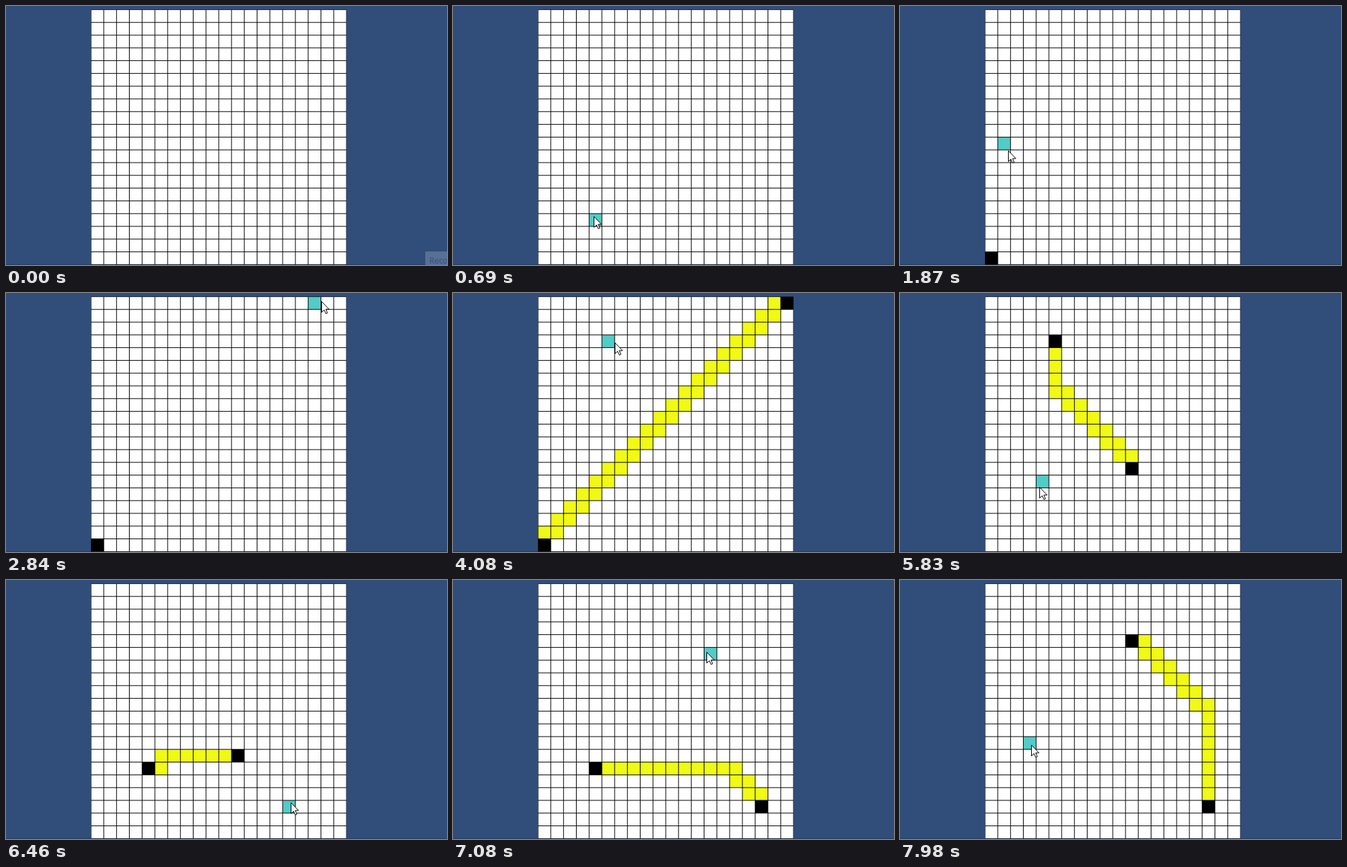
Write an HTML page with a canvas that moves like this. It is 649 px wide and 382 px high and loops after 8000 ms.

```html
<!DOCTYPE html>
<html lang="en">
<head>
<meta charset="utf-8">
<title>Grid path finder</title>
<style>
  html, body { margin: 0; width: 100%; height: 100%; overflow: hidden; background: #314d79; }
  canvas { position: absolute; left: 0; top: 0; display: block; }
  #tip {
    position: absolute; left: 617px; top: 362px; width: 32px; height: 20px;
    box-sizing: border-box; padding-left: 6px; overflow: hidden; white-space: nowrap;
    background: #586f96; color: #34507c;
    font: 12px/28px "Open Sans", "Noto Sans", sans-serif;
  }
</style>
</head>
<body>
<canvas id="stage" width="649" height="382"></canvas>
<div id="tip">Reco</div>
<script>
const LOOP = 8000, N = 20, PITCH = 18.8, LEFT = 125.1, TOP = 5.4, BORDER = 0.5;
const WHITE = '#fff', BLACK = '#000', TEAL = '#53cbc6', YELLOW = '#f0fa14';
const ctx = document.getElementById('stage').getContext('2d');
const tip = document.getElementById('tip');

// Key points of the pointer: time, x, y.
const route = [
  [70, 600, 376], [490, 240, 268], [630, 207, 310], [1250, 135, 370],
  [1530, 135, 370], [2200, 182, 62], [2420, 160, 14], [2840, 464, 12],
  [3250, 494, 12], [4080, 238, 73], [4290, 238, 73], [5120, 341, 262],
  [5810, 205, 286], [6640, 456, 335], [7060, 373, 106], [7270, 343, 97],
  [7960, 193, 243]
];

// The picture advances every 70 ms, with a longer rest once per 830 ms.
function snap(t) {
  const phase = (t + 70) % 830;
  return Math.max(0, t - phase + 70 * Math.min(10, Math.floor(phase / 70)));
}

const ease = f => f * f * (3 - 2 * f);

function pointer(t) {
  const k = route.findIndex(p => p[0] > t);
  if (k < 0) return route[route.length - 1].slice(1);
  const [t0, x0, y0] = route[k - 1], [t1, x1, y1] = route[k];
  const f = ease((t - t0) / (t1 - t0));
  return [Math.round(x0 + (x1 - x0) * f), Math.round(y0 + (y1 - y0) * f)];
}

function cellAt([x, y]) {
  return [Math.floor((x - 1 - LEFT) / PITCH), Math.floor((y - 1 - TOP) / PITCH)];
}

// Clicks place the start and the end in turn, in the cell under the pointer.
const clicks = [1250, 3250, 4290, 5120, 5880, 6640, 7270]
  .map(time => ({ time, cell: cellAt(pointer(time)) }));

// A moved start gives the staircase first, a moved end the straight part first.
function findPath([x, y], [ex, ey], stairsFirst) {
  const w = Math.abs(ex - x), h = Math.abs(ey - y);
  const sx = Math.sign(ex - x), sy = Math.sign(ey - y);
  const stairs = (sy < 0 && !stairsFirst ? 'vh' : 'hv').repeat(Math.min(w, h));
  const straight = (w > h ? 'h' : 'v').repeat(Math.abs(w - h));
  const moves = stairsFirst ? stairs + straight : straight + stairs;
  return [...moves].slice(0, -1).map(m => {
    if (m === 'h') x += sx; else y += sy;
    return [x, y];
  });
}

function drawCell(col, row, color) {
  const size = PITCH - 2 * BORDER;
  ctx.fillStyle = color;
  ctx.fillRect(LEFT + col * PITCH + BORDER, TOP + row * PITCH + BORDER, size, size);
}

function drawPointer(x, y) {
  const shape = [[0, 0], [0, 16], [3.7, 12.5], [6.3, 18], [8.6, 17], [6.2, 11.5], [11, 11.5]];
  ctx.beginPath();
  for (const [dx, dy] of shape) ctx.lineTo(x + dx + 0.5, y + dy + 0.5);
  ctx.closePath();
  ctx.fillStyle = WHITE;
  ctx.fill();
  ctx.strokeStyle = BLACK;
  ctx.stroke();
}

function draw(t) {
  ctx.fillStyle = '#314d79';
  ctx.fillRect(0, 0, 649, 382);
  ctx.fillStyle = '#2a3c5c';
  ctx.fillRect(0, 381, 649, 1);
  ctx.fillStyle = BLACK;
  ctx.fillRect(LEFT, TOP, N * PITCH, N * PITCH);

  const visible = t >= route[0][0];
  const done = clicks.filter(c => c.time <= t);
  const ends = done.slice(-2).map(c => c.cell);
  const startMoved = done.length % 2 === 1;
  if (startMoved) ends.reverse();

  const colors = {};
  if (ends.length === 2) {
    for (const cell of findPath(ends[0], ends[1], startMoved)) colors[cell] = YELLOW;
  }
  if (visible) colors[cellAt(pointer(t))] = TEAL;
  for (const cell of ends) colors[cell] = BLACK;

  for (let row = 0; row < N; row++) {
    for (let col = 0; col < N; col++) drawCell(col, row, colors[[col, row]] || WHITE);
  }
  if (visible) drawPointer(...pointer(t));
  tip.style.display = visible ? 'none' : 'block';
}

const began = performance.now();
function tick() {
  draw(snap((performance.now() - began) % LOOP));
  requestAnimationFrame(tick);
}
tick();
</script>
</body>
</html>
```
